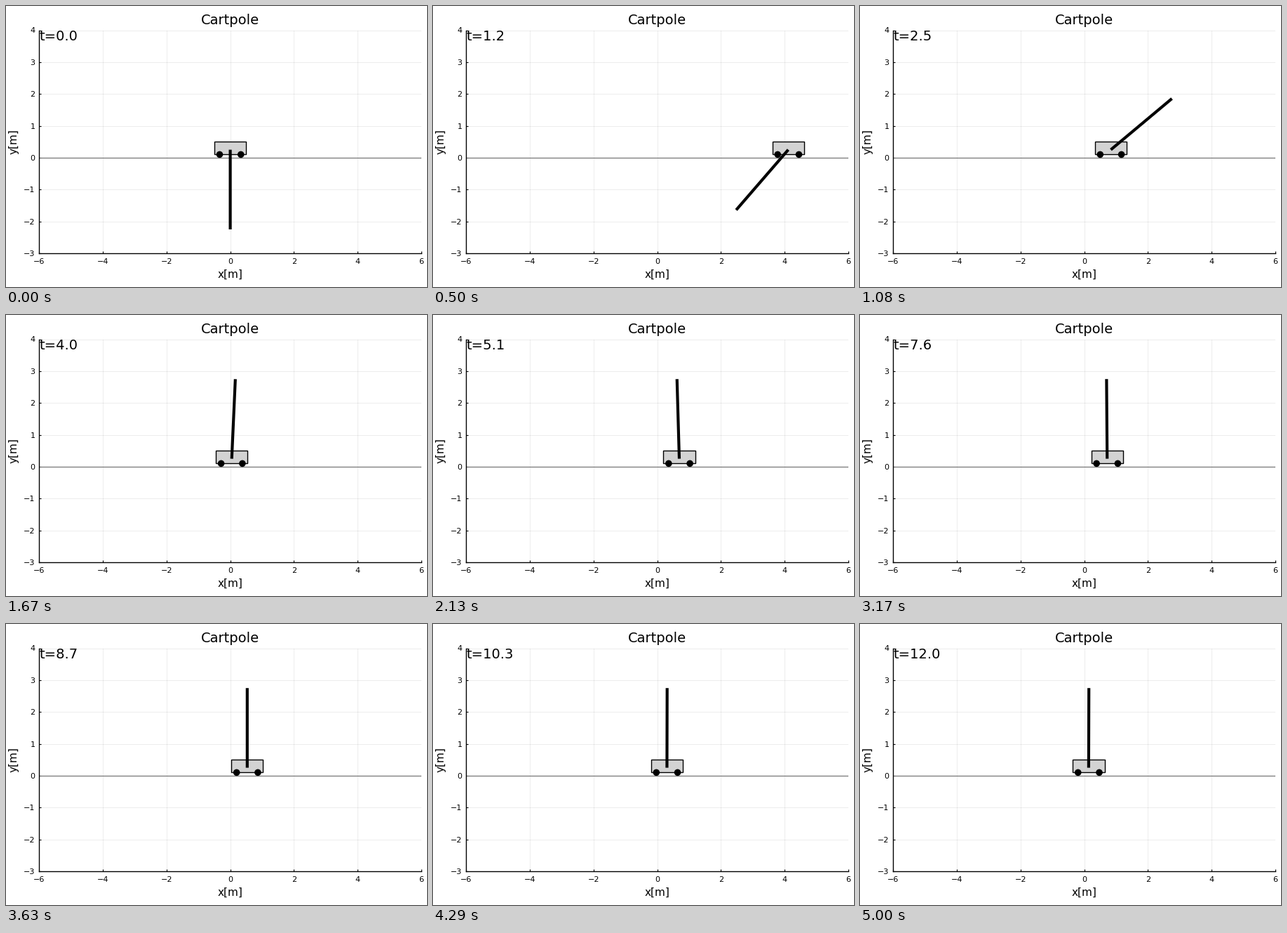
Recreate the animation shown at these times as a matplotlib script. Size 600 by 400 pixels, loop 5040 ms.

```python
import numpy as np
import matplotlib.pyplot as plt
from matplotlib.animation import FuncAnimation
from matplotlib.patches import Ellipse, Rectangle

plt.rcParams["font.family"] = "DejaVu Sans"

W, H, DPI = 600, 400, 100
LEFT, RIGHT, TOP, BOTTOM = 47.2, 592, 34.5, 352
FRAMES, LOOP_MS, DT = 121, 5040, 0.1
LENGTH, GRAVITY, PIVOT = 2.5, 9.81, 0.25
REACH = 5.85  # the tip of the pole stays left of this

# (time, cart position) and (time, pole angle from hanging) to pass through
CART = [(0, 0), (1.2, 4.113), (1.3, 4.47), (2.6, 0.392), (4, 0.047),
        (5.2, 0.71), (6.5, 0.815), (7.8, 0.69), (8.7, 0.533),
        (10.4, 0.295), (12, 0.138)]
POLE = [(0, 0), (1.2, -0.713), (2.6, 2.34), (4, np.pi - 0.045),
        (6.5, np.pi + 0.015), (8.7, np.pi), (12, np.pi - 0.003)]


def second_difference(n):
    """Accelerations from samples, starting at rest."""
    d = np.zeros((n - 1, n))
    d[0, :2] = -2, 2
    for i in range(1, n - 1):
        d[i, i - 1:i + 2] = 1, -2, 1
    return d / DT**2


def plan_motion():
    """Least-effort cart motion that swings the pole through the waypoints."""
    n = FRAMES
    d = second_difference(n)
    keep = np.eye(n)[:-1]
    cart, pole = np.array(CART), np.array(POLE)
    pins = np.rint(np.r_[cart[:, 0], pole[:, 0] + n * DT] / DT).astype(int)
    goals = np.r_[cart[:, 1], pole[:, 1]]
    pin_rows = np.eye(2 * n)[pins]
    w_swing, w_effort, w_pin, w_reach = 5, 0.1, 300, 30

    def system(z):
        x, phi = z[:n], z[n:]
        acc = d @ x
        s, c = np.sin(phi[:-1]), np.cos(phi[:-1])
        swing = LENGTH * (d @ phi) + GRAVITY * s + acc * c
        over = x + LENGTH * np.sin(phi) - REACH
        active = (over > 0).astype(float)
        res = np.r_[w_swing * swing, w_effort * acc,
                    w_pin * (z[pins] - goals), w_reach * over * active]
        by_phi = LENGTH * d + (GRAVITY * c - acc * s)[:, None] * keep
        jac = np.vstack([
            w_swing * np.hstack([c[:, None] * d, by_phi]),
            w_effort * np.hstack([d, np.zeros_like(d)]),
            w_pin * pin_rows,
            w_reach * np.hstack([np.diag(active),
                                 np.diag(active * LENGTH * np.cos(phi))]),
        ])
        return res, jac

    t = np.arange(n) * DT
    z = np.r_[np.interp(t, *cart.T), np.interp(t, *pole.T)]
    res, jac = system(z)
    damping = 1.0
    for _ in range(120):
        normal = jac.T @ jac + damping * np.eye(2 * n)
        step = np.linalg.solve(normal, jac.T @ res)
        new_res, new_jac = system(z - step)
        if new_res @ new_res < res @ res:
            z, res, jac = z - step, new_res, new_jac
            damping = max(damping * 0.3, 1e-6)
            if np.abs(step).max() < 1e-6:
                break
        else:
            damping *= 4
    return z[:n], z[n:]


def label(x, y, text, size, **kw):
    """Text at a pixel position counted from the top left."""
    kw = {"ha": "center", "va": "baseline", **kw}
    return fig.text(x / W, 1 - y / H, text, fontsize=size, color="black", **kw)


def px(width):
    return width * 72 / DPI


cart_x, pole_angle = plan_motion()

fig = plt.figure(figsize=(W / DPI, H / DPI), dpi=DPI, facecolor="white")
ax = fig.add_axes([LEFT / W, 1 - BOTTOM / H, (RIGHT - LEFT) / W,
                   (BOTTOM - TOP) / H])
ax.set(xlim=(-6, 6), ylim=(-3, 4), xticks=range(-6, 7, 2),
       yticks=range(-3, 5))
ax.spines[["top", "right"]].set_visible(False)
for side in ("left", "bottom"):
    ax.spines[side].set_linewidth(1)
ax.tick_params(direction="in", length=px(3.2), width=0.8,
               labelbottom=False, labelleft=False)
ax.grid(color="black", alpha=0.1, linewidth=0.5)
ax.set_axisbelow(True)

unit_x, unit_y = (RIGHT - LEFT) / 12, (BOTTOM - TOP) / 7
for v in range(-6, 7, 2):
    label(LEFT + (v + 6) * unit_x, 367, f"{v}".replace("-", "\u2212"), 8)
for v in range(-3, 5):
    label(41.5, BOTTOM - (v + 3) * unit_y + 4,
          f"{v}".replace("-", "\u2212"), 8, ha="right")
label(319.5, 26, "Cartpole", 14)
label(319.5, 387, "x[m]", 11)
label(11, 193.3, "y[m]", 11, rotation=90, va="center")
clock = label(LEFT, 49.3, "", 14, ha="left")

ax.axhline(0, color="#808080", linewidth=1, zorder=2)
cart = ax.add_patch(Rectangle((0, 0.1), 1, 0.4, facecolor="lightgray",
                              edgecolor="black", linewidth=1, zorder=3))
wheels = [ax.add_patch(Ellipse((0, 0.1), 9.6 / unit_x, 9.6 / unit_y,
                               color="black", linewidth=0, zorder=4))
          for _ in range(2)]
pole, = ax.plot([], [], color="black", linewidth=3,
                solid_capstyle="butt", zorder=5)


def draw(i):
    x, phi = cart_x[i], pole_angle[i]
    cart.set_x(x - 0.5)
    for wheel, side in zip(wheels, (-1, 1)):
        wheel.set_center((x + side / 3, 0.1))
    pole.set_data([x, x + LENGTH * np.sin(phi)],
                  [PIVOT, PIVOT - LENGTH * np.cos(phi)])
    clock.set_text(f"t={i * DT:.1f}")
    return cart, *wheels, pole, clock


anim = FuncAnimation(fig, draw, frames=FRAMES, interval=LOOP_MS / FRAMES,
                     repeat=True, repeat_delay=0)
plt.show()
```
